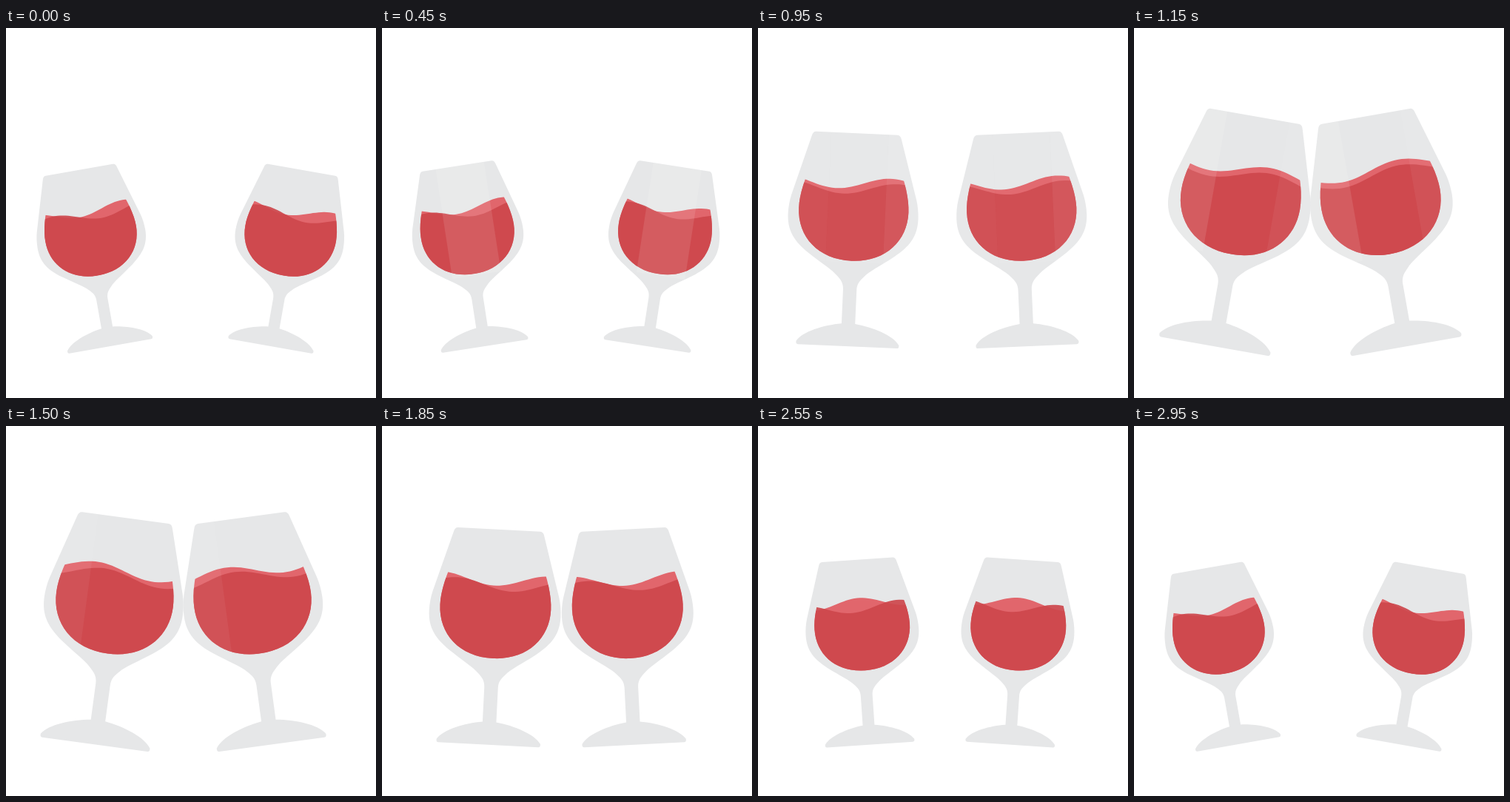
An HTML page that plays this animation: 500x500 px, repeating every 3 s.

```html
<!DOCTYPE html>
<html lang="en">
<head>
<meta charset="utf-8">
<title>Cheers</title>
<style>
  html, body { margin: 0; width: 100%; height: 100%; overflow: hidden; background: #fff; }
  svg { display: block; width: 100vw; height: 100vh; }
  .glass { fill: #e6e7e8; }
  .back { fill: #e1666c; }
  .front { fill: #ce474d; fill-opacity: .92; }
  .shine { fill: #fff; }
</style>
</head>
<body>
<svg viewBox="0 0 500 500">
  <defs>
    <!-- Glass coordinates: origin at the middle of the foot -->
    <path id="body" d="M-51-267.5 H51 Q55-267.5 56.3-262 L78.5-187 C80.5-180 81.7-171 81.7-163
      C81.7-140 71-128 54-115 C36-102 23-95 17-88 C12-83 8.5-79 8.5-71 V-28.3
      C31-25.3 57-16 64.5-4 Q65 0 62 0 H-62 Q-65 0-64.5-4 C-57-16-31-25.3-8.5-28.3
      V-71 C-8.5-79-12-83-17-88 C-23-95-36-102-54-115 C-71-128-81.7-140-81.7-163
      C-81.7-171-80.5-180-78.5-187 L-56.3-262 Q-55-267.5-51-267.5Z"/>
    <clipPath id="inBody"><use href="#body"/></clipPath>
    <clipPath id="inBowl">
      <path d="M-52-235 C-63-208-68.5-188-68.5-171 C-68.5-134-41-107.3.3-107.3
        C41.5-107.3 69.2-134 69.2-171 C69.2-188 63.5-208 52.5-235Z"/>
    </clipPath>
    <g id="drink">
      <use href="#body" class="glass"/>
      <g clip-path="url(#inBowl)">
        <path id="back" class="back"/>
        <path id="front" class="front"/>
      </g>
      <g class="shine" clip-path="url(#inBody)">
        <rect class="strip" x="-90" y="-270" width="58" height="165"/>
        <rect class="strip" x="-32" y="-270" width="72" height="165"/>
        <rect class="strip" x="40" y="-270" width="50" height="165"/>
      </g>
    </g>
  </defs>
  <use id="left" href="#drink"/>
  <use id="right" href="#drink"/>
</svg>
<script>
  const LOOP = 3000, CLINK = 1150, UPRIGHT = 2250, END = 2950;
  const WAVELENGTH = 136, WAVE_HEIGHT = 7.3;
  const byId = id => document.getElementById(id);
  const strips = document.querySelectorAll('.strip');
  const stripPeaks = [1150, 450, 800];

  // Crest position of each wave over time
  const crestTimes = [0, 800, 1150, 1850, 2250, 2550, END];
  const backCrests = [56, 52, 28, -70, -40, -2, 56];
  const frontCrests = [88, 68, 28, -49, -21, 54, 88];

  const clamp = u => Math.min(1, Math.max(0, u));
  const lerp = (a, b, u) => a + (b - a) * u;
  const swing = (t, from, to) => (1 - Math.cos(Math.PI * clamp((t - from) / (to - from)))) / 2;
  const rush = t => clamp(t / 1105) ** 3.1;

  function smooth(times, values, t) {
    const last = times.length - 1;
    const slope = i => i === 0 || i === last ? 0
      : (values[i + 1] - values[i - 1]) / (times[i + 1] - times[i - 1]);
    let i = 0;
    while (i < last - 1 && t >= times[i + 1]) i++;
    const span = times[i + 1] - times[i];
    const u = clamp((t - times[i]) / span), v = 1 - u;
    return v * v * (1 + 2 * u) * values[i] + u * u * (1 + 2 * v) * values[i + 1]
      + u * v * span * (v * slope(i) - u * slope(i + 1));
  }

  function wave(level, crest) {
    let d = 'M-72-100';
    for (let x = -72; x <= 72; x += 4) {
      const y = level - WAVE_HEIGHT * Math.cos(2 * Math.PI * (x - crest) / WAVELENGTH);
      d += `L${x} ${y.toFixed(2)}`;
    }
    return d + 'L72-100Z';
  }

  // Value through the three poses: apart, clink, upright, apart
  function pose(t, apart, clink, upright) {
    if (t < CLINK) return lerp(apart, clink, rush(t));
    if (t < UPRIGHT) return lerp(clink, upright, swing(t, CLINK, UPRIGHT));
    return lerp(upright, apart, swing(t, UPRIGHT, END));
  }

  function place(id, x, y, angle, scale) {
    byId(id).setAttribute('transform', `translate(${x} ${y}) rotate(${angle}) scale(${scale})`);
  }

  function draw(now) {
    const t = now % LOOP;
    const angle = pose(t, -10, 10, 0);
    const y = pose(t, 430, 430.2, 431);
    const scale = t < CLINK ? lerp(.904, 1.18, rush(t)) : lerp(1.18, .904, swing(t, CLINK, END));
    place('left', pose(t, 141, 108.7, 157.9), y, angle, scale);
    place('right', pose(t, 357.5, 368, 329.7), y, -angle, scale);

    byId('back').setAttribute('d', wave(-205, smooth(crestTimes, backCrests, t)));
    byId('front').setAttribute('d', wave(-198.5, smooth(crestTimes, frontCrests, t)));

    strips.forEach((strip, i) => {
      const dt = t - stripPeaks[i];
      const glow = clamp(dt < 0 ? 1 + dt / 350 : 1 - dt / 700);
      strip.setAttribute('opacity', (.1 * glow).toFixed(3));
    });
  }

  const start = performance.now();
  function tick() {
    draw(performance.now() - start);
    requestAnimationFrame(tick);
  }
  tick();
</script>
</body>
</html>
```
